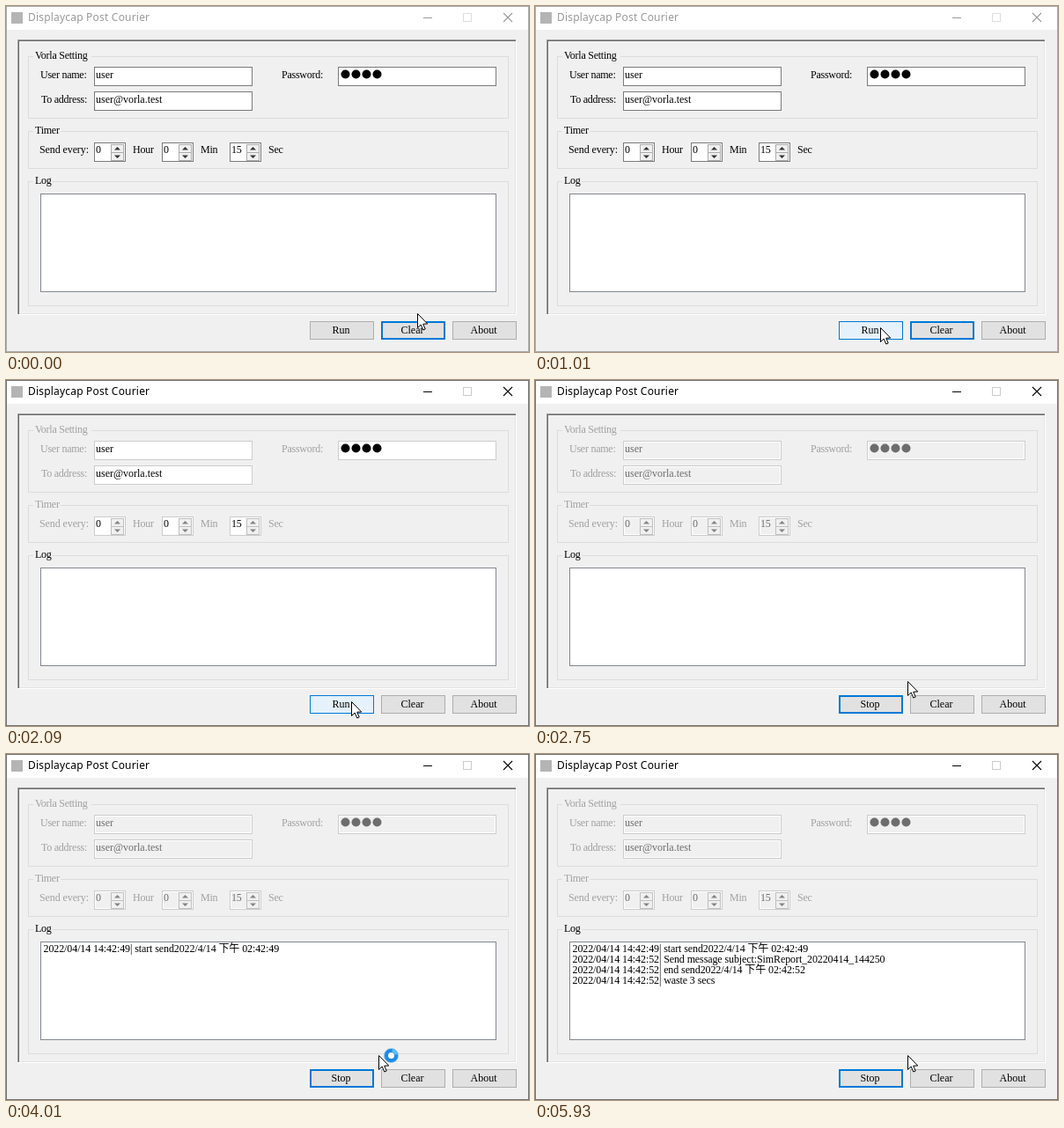
Recreate the animation shown at these times as an HTML page with a canvas. Size 594x393 px, loop 8000 ms.

```html
<!DOCTYPE html>
<html lang="en">
<head>
<meta charset="utf-8">
<style>
  html, body { margin: 0; width: 100%; height: 100%; overflow: hidden; background: #f0f0f0; }
  canvas { display: block; }
</style>
</head>
<body>
<canvas id="stage" width="594" height="393"></canvas>
<script>
const ctx = document.getElementById('stage').getContext('2d');
const LOOP = 8000;
const SERIF = '12px "Liberation Serif", "Noto Sans CJK TC", "Noto Sans CJK JP", "Noto Sans CJK", serif';
const SANS = '12px "Noto Sans", "Open Sans", sans-serif';

const LOG = [
  '2022/04/14 14:42:49| start send2022/4/14 下午 02:42:49',
  '2022/04/14 14:42:52| Send message subject:SimReport_20220414_144250',
  '2022/04/14 14:42:52| end send2022/4/14 下午 02:42:52',
  '2022/04/14 14:42:52| waste 3 secs'
];

// [start time, x, y] of each pointer position
const POINTER = [[0, 467, 349], [70, 396, 356], [990, 394, 361], [1010, 392, 365], [2750, 423, 342]];
const SPIN_TIMES = [3250, 3500, 3680, 3740, 3800, 3860, 4010, 4060, 4340];

function fill(x, y, w, h, color) {
  ctx.fillStyle = color;
  ctx.fillRect(x, y, w, h);
}

function frame(x, y, w, h, color, line = 1) {
  ctx.strokeStyle = color;
  ctx.lineWidth = line;
  ctx.strokeRect(x + line / 2, y + line / 2, w - line, h - line);
}

function text(str, x, y, color = '#000', { font = SERIF, spacing = -0.25, align = 'left' } = {}) {
  ctx.font = font;
  ctx.letterSpacing = spacing + 'px';
  ctx.textAlign = align;
  ctx.fillStyle = color;
  ctx.fillText(str, x, y);
}

function polygon(points, color) {
  ctx.beginPath();
  points.forEach(([x, y]) => ctx.lineTo(x, y));
  ctx.closePath();
  ctx.fillStyle = color;
  ctx.fill();
}

function arc(x, y, r, from, to, color, line) {
  ctx.beginPath();
  ctx.arc(x, y, r, from, to);
  ctx.strokeStyle = color;
  ctx.lineWidth = line;
  ctx.stroke();
}

function windowChrome(active) {
  const ink = active ? '#000' : '#999';
  fill(0, 0, 594, 393, '#f0f0f0');
  fill(1, 1, 592, 26, '#fff');
  frame(0, 0, 594, 393, active ? '#707070' : '#aaa');
  fill(6, 7, 13, 13, '#b4b4b4');
  text('Displaycap Post Courier', 25, 17, ink, { font: SANS, spacing: 0.2 });

  fill(474, 13, 10, 1, ink);
  frame(519, 8, 10, 10, active ? '#ccc' : '#ddd');
  ctx.beginPath();
  ctx.moveTo(565, 8); ctx.lineTo(575, 18);
  ctx.moveTo(575, 8); ctx.lineTo(565, 18);
  ctx.strokeStyle = ink;
  ctx.lineWidth = 1.1;
  ctx.stroke();

  // sunken panel
  fill(13, 38, 567, 1, '#a0a0a0');
  fill(13, 38, 1, 313, '#a0a0a0');
  fill(14, 39, 565, 1, '#696969');
  fill(14, 39, 1, 311, '#696969');
  fill(579, 38, 1, 313, '#fff');
  fill(13, 350, 567, 1, '#fff');
  fill(578, 40, 1, 310, '#e3e3e3');
  fill(15, 349, 564, 1, '#e3e3e3');
}

function group(title, y, h, titleWidth, ink) {
  frame(25, y, 546, h, '#dcdcdc');
  fill(31, y, titleWidth + 3, 1, '#f0f0f0');
  text(title, 33, y + 3, ink);
}

function field(x, y, w, h, border, back) {
  fill(x, y, w, h, '#fff');
  fill(x + 2, y + 2, w - 4, h - 4, back);
  frame(x, y, w, h, border);
}

function spinner(x, value, look) {
  field(x, 155, 36, 22, look.border, look.back);
  text(value, x + 2, 167, look.value);
  for (const [y, dir] of [[157, -1], [166, 1]]) {
    fill(x + 19, y, 15, 10, '#f0f0f0');
    frame(x + 19, y, 15, 10, look.step);
    const cx = x + 26.5, cy = y + 5;
    polygon([[cx - 3.5, cy - 1.5 * dir], [cx + 3.5, cy - 1.5 * dir], [cx, cy + 2 * dir]], look.arrow);
  }
}

function button(label, x, style) {
  fill(x, 358, 73, 21, style === 'hover' ? '#e5f1fb' : '#e1e1e1');
  frame(x, 358, 73, 21, style ? '#0078d7' : '#adadad', style === 'focus' ? 2 : 1);
  text(label, x + 35.5, 372, '#000', { align: 'center', spacing: 0 });
}

function form(t) {
  const off = t >= 1690, dim = t >= 2300;
  const label = off ? '#a0a0a0' : '#000';
  const look = {
    border: off ? '#ccc' : '#7a7a7a',
    back: dim ? '#f0f0f0' : '#fff',
    value: dim ? '#6d6d6d' : '#000',
    step: off ? '#bfbfbf' : '#acacac',
    arrow: off ? '#838383' : '#333'
  };

  group('Vorla Setting', 57, 71, 63, label);
  group('Timer', 142, 43, 28, label);
  group('Log', 199, 142, 19, '#000');

  field(100, 69, 180, 22, look.border, look.back);
  field(100, 97, 180, 22, look.border, look.back);
  field(377, 69, 180, 22, look.border, look.back);
  text('User name:', 39, 82, label);
  text('To address:', 40, 110, label);
  text('Password:', 313, 82, label);
  text('user', 102, 82, look.value, { spacing: 0 });
  text('user@vorla.test', 102, 110, look.value, { spacing: 0 });
  for (let i = 0; i < 4; i++) {
    ctx.beginPath();
    ctx.arc(385.5 + 12 * i, 77.5, 5, 0, 2 * Math.PI);
    ctx.fillStyle = look.value;
    ctx.fill();
  }

  text('Send every:', 38, 167, label, { spacing: -0.1 });
  [['0', 100, 'Hour', 144], ['0', 177, 'Min', 221], ['15', 254, 'Sec', 298]].forEach(([value, x, unit, unitX]) => {
    spinner(x, value, look);
    text(unit, unitX, 167, label);
  });

  field(39, 213, 518, 112, '#828790', '#fff');
  const lines = t >= 5930 ? 4 : t >= 2870 ? 1 : 0;
  LOG.slice(0, lines).forEach((line, i) => text(line, 42.5, 225 + 12 * i, '#000', { spacing: -0.1 }));

  const runStyle = t < 990 ? '' : t < 2750 ? 'hover' : 'focus';
  button(dim ? 'Stop' : 'Run', 345, runStyle);
  button('Clear', 426, off ? '' : 'focus');
  button('About', 507, '');
}

function pointer(t) {
  const [, x, y] = POINTER.findLast(p => t >= p[0]);
  const outline = [[0.5, 0.5], [0.5, 16.5], [4.2, 13], [6.8, 19], [9.2, 18], [6.7, 12.2], [11.7, 12]];
  polygon(outline.map(([dx, dy]) => [x + dx, y + dy]), '#fff');
  ctx.strokeStyle = '#000';
  ctx.lineWidth = 1;
  ctx.stroke();
}

function busyRing(t) {
  if (t < 3120 || t >= 4560) return;
  const step = SPIN_TIMES.findLast(s => t >= s) ?? 3250;
  const angle = (-135 + 0.178 * (step - 3500)) * Math.PI / 180;
  ctx.globalAlpha = t < 3250 || t >= 4520 ? 0.5 : 1;
  ctx.beginPath();
  ctx.arc(437.5, 342.5, 8, 0, 2 * Math.PI);
  ctx.fillStyle = '#fff';
  ctx.fill();
  arc(437.5, 342.5, 5.8, 0, 2 * Math.PI, '#1e8ae6', 4.6);
  arc(437.5, 342.5, 5.8, angle - 0.6, angle + 0.6, '#62bdf8', 3);
  arc(437.5, 342.5, 8, 0, 2 * Math.PI, '#8cc8f4', 0.8);
  ctx.globalAlpha = 1;
}

function draw(now) {
  const t = now % LOOP;
  windowChrome(t >= 2090);
  form(t);
  pointer(t);
  busyRing(t);
}

const start = performance.now();
function tick() {
  draw(performance.now() - start);
  requestAnimationFrame(tick);
}
tick();
</script>
</body>
</html>
```
